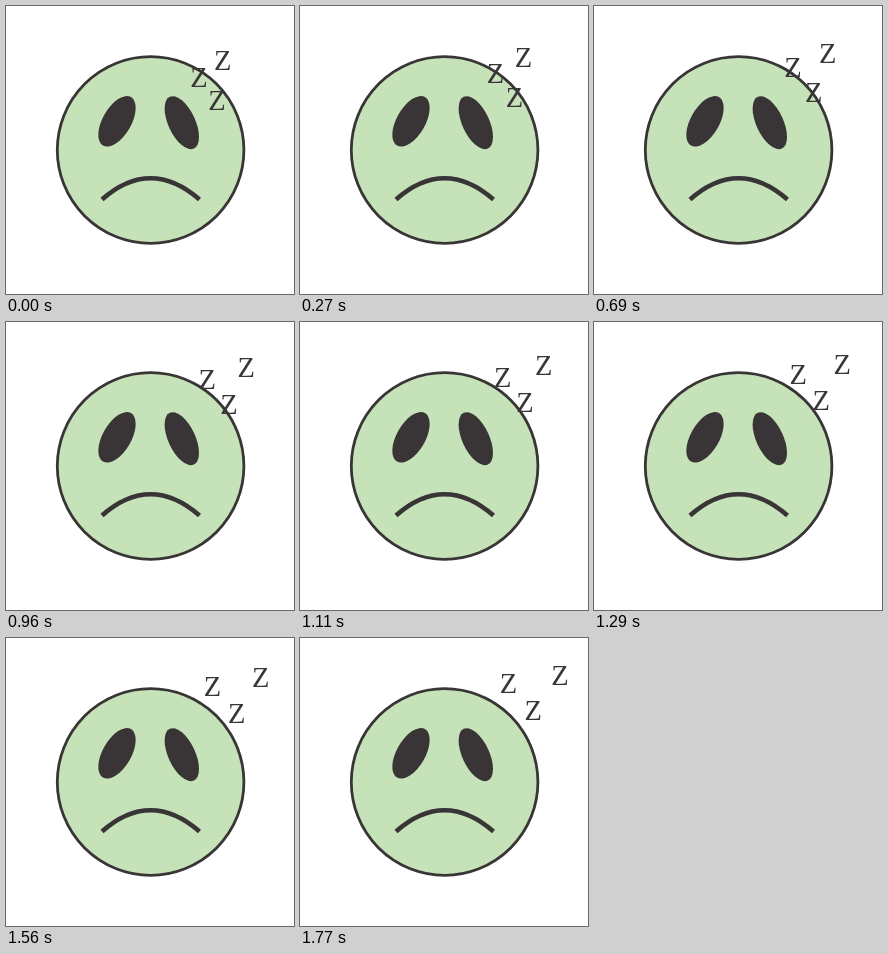
Animation of 288 by 288 pixels, one loop 1.8 s. Source, as an HTML page:

```html
<!DOCTYPE html>
<html lang="en">
<head>
<meta charset="utf-8">
<title>Sleepy face</title>
<style>
  html, body { margin: 0; width: 100%; height: 100%; overflow: hidden; background: #fff; }
  svg { display: block; width: 100vw; height: 100vh; }
  text { font: 28.5px "Liberation Serif", "Times New Roman", serif; text-anchor: middle; }
</style>
</head>
<body>
<svg viewBox="0 0 288 288" fill="#393536">
  <circle cx="144.6" cy="144" r="93.3" fill="#c6e2b9" stroke="#393536" stroke-width="2.8"/>
  <ellipse rx="14.3" ry="28" transform="translate(111 115.3) rotate(30)"/>
  <ellipse rx="13.5" ry="28.6" transform="translate(175.8 116.7) rotate(-25)"/>
  <path d="M96 193.5C128 165.2 161 165.2 193.5 193.5" fill="none" stroke="#393536" stroke-width="4.6"/>
  <g id="snores"></g>
</svg>
<script>
  const LOOP = 1800, STEP = 30;
  const BASELINE = 9.4; // from a letter's centre to its baseline

  // Centre of each letter at the start, and its drift over one loop
  const drifts = [
    { x: 193, y: 72, dx: 15.6, dy: -27 },
    { x: 216.8, y: 54.7, dx: 43.8, dy: -17.4 },
    { x: 211, y: 94.8, dx: 22.6, dy: -22.4 }
  ];

  const group = document.getElementById("snores");
  const letters = drifts.map(() => {
    const letter = document.createElementNS("http://www.w3.org/2000/svg", "text");
    letter.textContent = "Z";
    return group.appendChild(letter);
  });

  function draw(time) {
    const progress = Math.floor((time % LOOP) / STEP) * STEP / LOOP;
    drifts.forEach(({ x, y, dx, dy }, i) => {
      letters[i].setAttribute("x", x + dx * progress);
      letters[i].setAttribute("y", y + dy * progress + BASELINE);
    });
  }

  const start = performance.now();
  function tick() {
    draw(performance.now() - start);
    requestAnimationFrame(tick);
  }
  tick();
</script>
</body>
</html>
```
